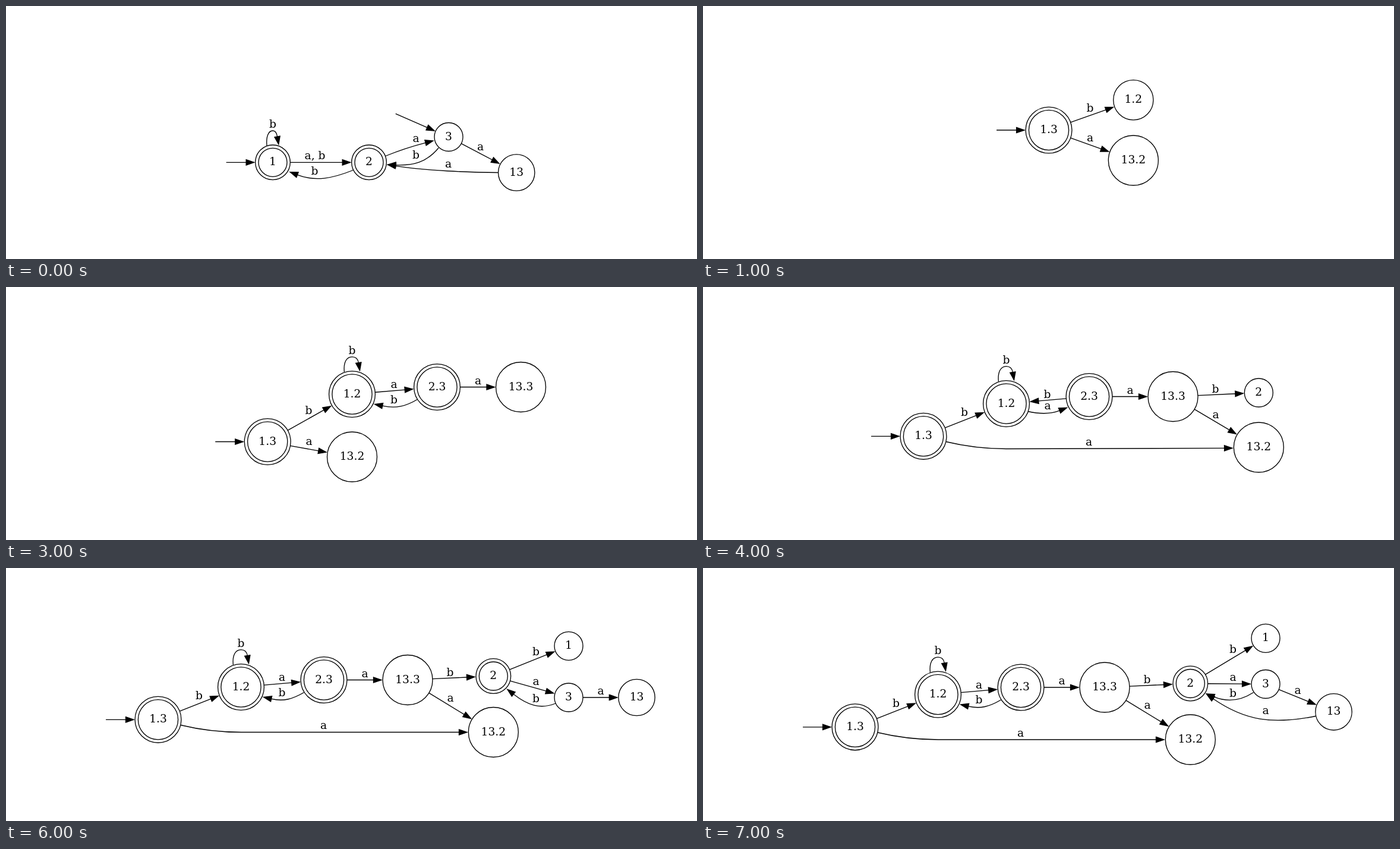
Write an HTML page that moves like this. It is 1163 px wide and 426 px high and loops after 8 s.

```html
<!DOCTYPE html>
<html>
<head>
<meta charset="utf-8">
<style>
html, body { margin: 0; width: 100%; height: 100%; overflow: hidden; background: #fff; }
svg { display: block; }
circle, path { fill: none; stroke: #000; stroke-width: 1.33; }
.head { fill: #000; }
text { font: 18.67px "DejaVu Serif", serif; text-anchor: middle; }
</style>
</head>
<body>
<svg id="stage" width="1163" height="426" viewBox="0 0 1163 426"></svg>
<script>
const RADII = [0, 24, 30.7, 33.6, 42]; // by label length
const STEP = 1000;
let out;

const text = (s, x, y) => out += `<text x="${x}" y="${y}">${s}</text>`;
const circle = (x, y, r) => out += `<circle cx="${x}" cy="${y}" r="${r}"/>`;

function node(name, x, y, accepting) {
  let r = RADII[name.length];
  circle(x, y, r);
  if (accepting) circle(x, y, r += 5.33);
  text(name, x, y + 5);
  return { x, y, r };
}

// Draws a path and its arrowhead; `p` holds flat x,y pairs, the last one is the tip.
function arrow(p) {
  const n = p.length, cubic = n > 4;
  const ex = p[n - 2], ey = p[n - 1];
  const angle = Math.atan2(ey - p[n - 3], ex - p[n - 4]);
  const c = Math.cos(angle), s = Math.sin(angle);
  const back = (d, w) => [ex - d * c - w * s, ey - d * s + w * c];
  const body = [...p.slice(2, -2), ...back(15.5, 0)];
  out += `<path d="M${p.slice(0, 2)}${cubic ? "C" : "L"}${body}"/>`;
  out += `<path class="head" d="M${back(2.2, 0)}L${back(15.5, 4.67)}L${back(15.5, -4.67)}Z"/>`;
}

function line(a, b, label, lx, ly) {
  const d = Math.hypot(b.x - a.x, b.y - a.y), c = (b.x - a.x) / d, s = (b.y - a.y) / d;
  arrow([a.x + a.r * c, a.y + a.r * s, b.x - b.r * c, b.y - b.r * s]);
  if (label) text(label, lx, ly);
}

function curve(label, lx, ly, ...points) {
  arrow(points);
  text(label, lx, ly);
}

const start = (b, x = b.x - b.r - 49, y = b.y) => line({ x, y, r: 0 }, b);

function loop({ x, y, r }, label) {
  const w = r / 3 + 0.2, top = y - r - 24, foot = top + 25.4;
  arrow([x - w, foot, x - w - 1.5, top + 10, x - w * 0.75, top, x, top,
    x + w * 0.45, top, x + w * 0.8, top + 3.5, x + w, foot - 0.4].slice(0, 8).concat(
    [x + w * 0.5, top, x + w - 3.3, top + 4.5, x + w + 0.2, foot - 0.2]));
  text(label, x, top - 5);
}

function first() {
  const n1 = node("1", 449, 263.3, true), n2 = node("2", 611, 263.3, true);
  const n3 = node("3", 745, 220.5), n13 = node("13", 859.2, 280.5);
  start(n1);
  start(n3, 655.7, 181.3);
  loop(n1, "b");
  line(n1, n2, "a, b", 520, 258.3);
  curve("b", 519.5, 283.5, 584, 276.5, 549, 290.5, 521, 296, 476, 278.8);
  curve("a", 690, 229, 639, 252.5, 660, 244, 682, 236.5, 721, 226.5);
  curve("b", 690, 257, 728, 239, 707, 264, 685, 269, 640.5, 267);
  line(n3, n13, "a", 798.5, 242.5);
  curve("a", 744.5, 272, 828, 280.5, 780, 280.3, 705, 277, 640.5, 267);
}

function seed() {
  const n13 = node("1.3", 582, 209, true);
  start(n13);
  line(n13, node("1.2", 724.3, 158.3), "b", 651.5, 178);
  line(n13, node("13.2", 724.3, 260), "a", 651.5, 228);
}

// Stage where 13.2 still sits below 1.2
function grow(expanded) {
  const n13 = node("1.3", 518.7, 260.5, true), n12 = node("1.2", 661, 180.5, true);
  start(n13);
  line(n13, n12, "b", 588, 213.5);
  line(n13, node("13.2", 661, 286), "a", 588.5, 266);
  loop(n12, "b");
  if (!expanded) return line(n12, node("2.3", 796.3, 180.5), "a", 732, 175.5);
  const n23 = node("2.3", 804, 168.5, true);
  line(n12, n23, "a", 731.5, 170);
  curve("b", 731.5, 196, 770.5, 189.5, 751, 201, 735, 205, 697, 197);
  line(n23, node("13.3", 945, 168.5), "a", 873, 163.5);
}

// Chain shared by the later stages; returns node 2
function chain(early) {
  const n13 = node("1.3", 316, 250.3, true), n12 = node("1.2", 455.5, 195.5, true);
  const n23 = node("2.3", 595, 183.5, true), n133 = node("13.3", 736, 183.5);
  const n132 = node("13.2", 880.3, early ? 269 : 271.5), n2 = node("2", 880.3, 177, !early);
  start(n13);
  line(n13, n12, "b", 385, 216);
  loop(n12, "b");
  if (early) {
    line(n23, n12, "b", 524.5, 185.5);
    curve("a", 525, 205, 492, 208.5, 512, 213, 530, 213, 559.5, 201.5);
  } else {
    line(n12, n23, "a", 524.5, 185);
    curve("b", 524.5, 210.5, 561.5, 204.5, 542, 216, 527, 220, 491.5, 212);
  }
  line(n23, n133, "a", 664, 178.5);
  line(n133, n2, "b", 807.5, 176.5);
  line(n133, n132, "a", 808, 219.5);
  curve("a", 594.5, 266, 354, 259.5, 385, 267, 420, 271.5, 456, 271.5,
    600, 271.5, 735, 271.5, 838, (271.5 + n132.y) / 2);
  return n2;
}

function branch(y1, y3, labelB, labelA) {
  const n2 = chain(), n3 = node("3", 1007, y3);
  line(n2, node("1", 1007, y1), "b", 952, labelB);
  line(n2, n3, "a", 952, labelA);
  return n3;
}

function back() {
  const n3 = branch(126.3, 213, 142, 192);
  curve("b", 952, 221, 985, 223, 959, 233.5, 938, 226, 902, 198);
  line(n3, node("13", 1121.5, 213), "a", 1061, 208);
}

function complete() {
  const n3 = branch(100.8, 178, 125.5, 172.5);
  curve("b", 952, 199.5, 986.5, 192, 965, 206, 942, 208.5, 905.5, 193.5);
  line(n3, node("13", 1121.5, 224.8), "a", 1061, 194.5);
  curve("a", 1007, 228.5, 1091, 232, 1018, 246.5, 972, 239.5, 906, 194);
}

// Each scene: drawing function with its offset
const scenes = [
  [first, 0, 0],
  [seed, 0, 0],
  [() => grow(false), 0, 0],
  [() => grow(true), -78.5, 0],
  [() => chain(true), 55, 1],
  [() => branch(141, 213, 151, 192.5), 0, 0],
  [back, -60, 5],
  [complete, -60, 17.5],
].map(([draw, dx, dy]) => {
  out = "";
  draw();
  return `<g transform="translate(${dx} ${dy})">${out}</g>`;
});

const stage = document.getElementById("stage");
let shown = -1;
function frame() {
  const i = Math.floor(performance.now() / STEP) % scenes.length;
  if (i !== shown) stage.innerHTML = scenes[shown = i];
  requestAnimationFrame(frame);
}
frame();
</script>
</body>
</html>
```
